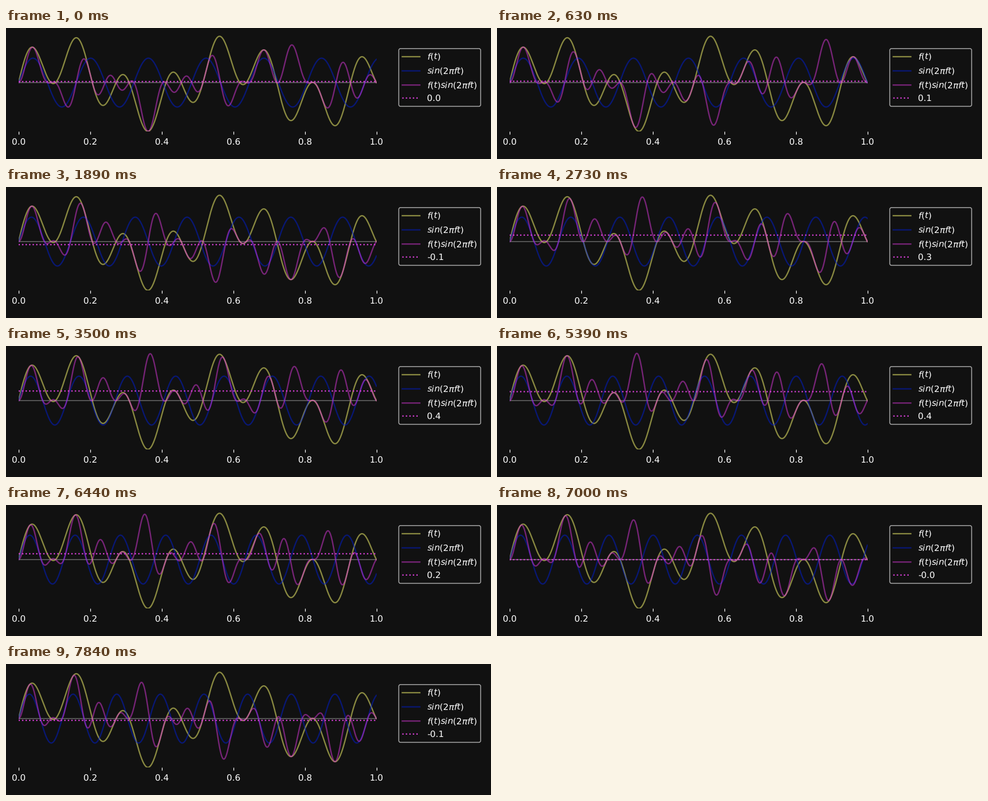
A matplotlib script that plays this animation: 840 by 228 pixels, repeating every 8 s.

```python
import matplotlib.pyplot as plt
import numpy as np
from matplotlib.animation import FuncAnimation

W, H, DPI = 840, 228, 96
PT = 72 / DPI  # points per pixel
BG = "#111111"
FONT = 15.15 * PT
LINE = 2.3 * PT
LOOP, STEP = 8000, 20

# The probe frequency holds each value until the next time (ms).
TIMES = [0, 70, 630, 1190, 1680, 2170, 2730, 3430,
         3920, 4410, 4900, 5390, 5950, 6510, 7000, 7490]
FREQS = [6.2, 6.4, 6.5, 6.7, 6.9, 7.1, 7.3, 7.4,
         7.5, 7.6, 7.7, 7.8, 7.9, 8.0, 8.1, 8.2]

plt.rcParams.update({
    "font.family": "DejaVu Sans",
    "mathtext.fontset": "dejavusans",
    "text.hinting": "none",
    "path.snap": False,
})


def wave(freq):
    return np.sin(2 * np.pi * freq * t)


t = np.linspace(0, 1, 1001)
signal = wave(2.1) + wave(7.6)

fig = plt.figure(figsize=(W / DPI, H / DPI), dpi=DPI, facecolor=BG)

# Plot area in pixels: x 21.7 to 641.5, y 10 to 180 from the top.
ax = fig.add_axes([21.7 / W, 48 / H, 619.8 / W, 170 / H], facecolor=BG)
ax.set(xlim=(0, 1), ylim=(-2, 2), yticks=[])
ax.set_xticks(np.linspace(0, 1, 6))
ax.spines[:].set_visible(False)
ax.tick_params(axis="x", colors="white", labelsize=FONT,
               length=5 * PT, width=1.2 * PT, pad=6.3 * PT)

ax.axhline(0, color="#6a6a6a", lw=1.5 * PT, zorder=1)


def curve(y, color, label, alpha=0.5):
    line, = ax.plot(t, y, color=color, alpha=alpha, lw=LINE, label=label)
    return line


curve(signal, "#e6e666", "$f(t)$", 0.57)
probe = curve(wave(FREQS[0]), "#001ed7", r"$sin(2\pi ft)$")
product = curve(signal, "#de37de", r"$f(t)sin(2\pi ft)$")
mean = ax.axhline(0, color="#d43fd4", ls=":", lw=LINE, label="0.0", zorder=3)

legend = ax.legend(loc="upper left", bbox_to_anchor=(680.3 / W, 1 - 35.8 / H),
                   bbox_transform=fig.transFigure, borderaxespad=0,
                   fontsize=FONT, labelcolor="white", labelspacing=0.48,
                   facecolor=BG, edgecolor="#cccccc")
legend.get_frame().set_linewidth(1.5 * PT)
mean_text = legend.get_texts()[-1]


def draw(frame):
    now = frame * STEP + STEP / 2
    freq = FREQS[np.searchsorted(TIMES, now, side="right") - 1]
    sine = wave(freq)
    prod = signal * sine
    avg = prod.mean()
    probe.set_ydata(sine)
    product.set_ydata(prod)
    mean.set_ydata([avg, avg])
    mean_text.set_text(f"{avg:.1f}")
    return probe, product, mean, mean_text


anim = FuncAnimation(fig, draw, frames=LOOP // STEP, interval=STEP,
                     repeat=True, repeat_delay=0)
plt.show()
```
